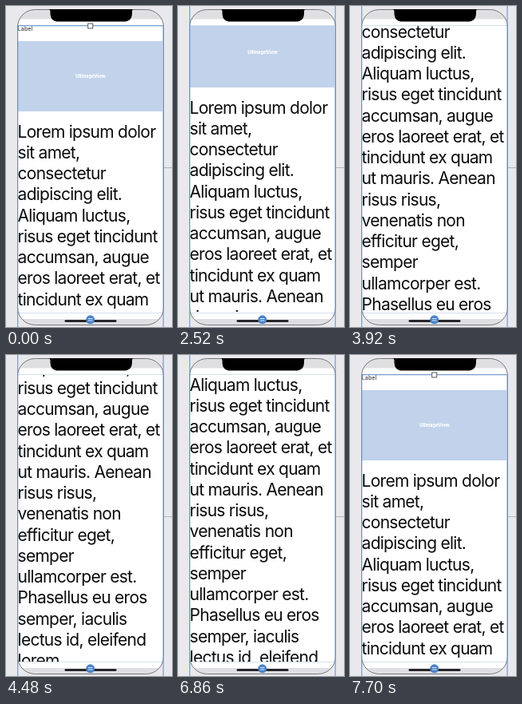
An HTML page that plays this animation: 208x402 px, repeating every 9240 ms.

```html
<!DOCTYPE html>
<html lang="la">
<head>
<meta charset="utf-8">
<title>Scroll view preview</title>
<style>
html, body { margin: 0; width: 100%; height: 100%; overflow: hidden; background: #e9e9ed; }
svg { display: block; width: 208px; height: 402px; }
text { font-family: Inter, Roboto, sans-serif; }
.body { font-size: 21px; letter-spacing: -0.74px; fill: #0b0b0d; }
.label { font-size: 7.2px; fill: #26262a; }
.tag { font-size: 5.8px; font-weight: 800; fill: #fff; text-anchor: middle; }
.guide { stroke: #d6e0ee; }
.edge { fill: none; stroke: #6d93c8; stroke-width: 1.1; }
</style>
</head>
<body>
<svg viewBox="0 0 208 402">
  <defs>
    <clipPath id="view"><rect x="14" y="24" width="184" height="360"/></clipPath>
    <clipPath id="phone"><rect x="14.5" y="4.5" width="183" height="395" rx="22"/></clipPath>
  </defs>
  <path d="M197 202.5H208" stroke="#b4b4b8"/>

  <g clip-path="url(#phone)">
    <rect width="208" height="402" fill="#dfdfe1"/>
    <rect y="16.5" width="208" height="375.5" fill="#fff"/>
  </g>
  <g clip-path="url(#view)">
    <g class="scroll">
      <text class="label" x="14.8" y="31.4">Label</text>
      <rect x="15" y="44" width="181" height="88" fill="#c1d2ea"/>
      <text class="tag" x="106" y="90.3">UIImageView</text>
      <g id="copy" class="body"></g>
      <rect x="15" y="653" width="181" height="53" fill="#55d5ff"/>
    </g>
  </g>
  <path class="guide" d="M14 24.5H198M14 384.5H198"/>

  <rect x="14.5" y="4.5" width="183" height="395" rx="22" fill="none" stroke="#77777b"/>
  <path d="M53 4H160Q158 4 158 7V9Q158 19.6 147 19.6H66Q55.5 19.6 55.5 9V7Q55.5 4 53 4Z" fill="#000"/>
  <rect x="73.5" y="393.2" width="65" height="2.6" rx="1.3" fill="#0a0a0c"/>

  <g class="scroll">
    <rect class="edge" x="14.7" y="24.7" width="182.4" height="681"/>
    <rect x="102.7" y="22" width="6" height="6" fill="#fff" stroke="#55585e"/>
    <rect x="102.7" y="703" width="6" height="6" fill="#fff" stroke="#4c83c8"/>
  </g>

  <circle cx="105.7" cy="392.8" r="5.5" fill="#4b83c9"/>
  <path d="M103 391.5H108.4M103 394H108.4" stroke="#dce8f7"/>
</svg>
<script>
const LOOP = 9240, STEP = 70;

const lines = `Lorem ipsum dolor
sit amet,
consectetur
adipiscing elit.
Aliquam luctus,
risus eget tincidunt
accumsan, augue
eros laoreet erat, et
tincidunt ex quam
ut mauris. Aenean
risus risus,
venenatis non
efficitur eget,
semper
ullamcorper est.
Phasellus eu eros
semper, iaculis
lectus id, eleifend
lorem.`.split("\n");

const copy = document.getElementById("copy");
lines.forEach((line, i) => {
  const el = document.createElementNS("http://www.w3.org/2000/svg", "text");
  el.setAttribute("x", 14.6);
  el.setAttribute("y", 164.7 + i * 26.25);
  el.textContent = line;
  copy.append(el);
});

// [time in ms, scroll offset in px]: a steady drag ending in a flick, each way
const keys = [
  [0, 0], [1960, 0], [2520, 30], [3430, 128], [4480, 247], [4690, 303],
  [4970, 322], [5740, 322], [6860, 225], [7280, 85], [7700, 0], [LOOP, 0]
];
const rate = i => (keys[i + 1][1] - keys[i][1]) / (keys[i + 1][0] - keys[i][0]);

// Harmonic mean of neighbouring rates keeps the curve free of overshoot.
const slopes = keys.map((_, i) => {
  if (i === 0 || i === keys.length - 1) return 0;
  const a = rate(i - 1), b = rate(i);
  return a * b > 0 ? 2 * a * b / (a + b) : 0;
});

function offsetAt(t) {
  let i = 0;
  while (i < keys.length - 2 && t >= keys[i + 1][0]) i++;
  const [t0, y0] = keys[i], [t1, y1] = keys[i + 1];
  const d = t1 - t0, u = (t - t0) / d, v = 1 - u;
  return y0 * v * v * (1 + 2 * u) + y1 * u * u * (3 - 2 * u)
    + d * u * v * (slopes[i] * v - slopes[i + 1] * u);
}

const layers = document.querySelectorAll(".scroll");
const start = performance.now();

function draw() {
  const t = Math.floor(((performance.now() - start) % LOOP) / STEP) * STEP;
  const y = -offsetAt(t).toFixed(2);
  layers.forEach(el => el.setAttribute("transform", `translate(0 ${y})`));
  requestAnimationFrame(draw);
}
draw();
</script>
</body>
</html>
```
